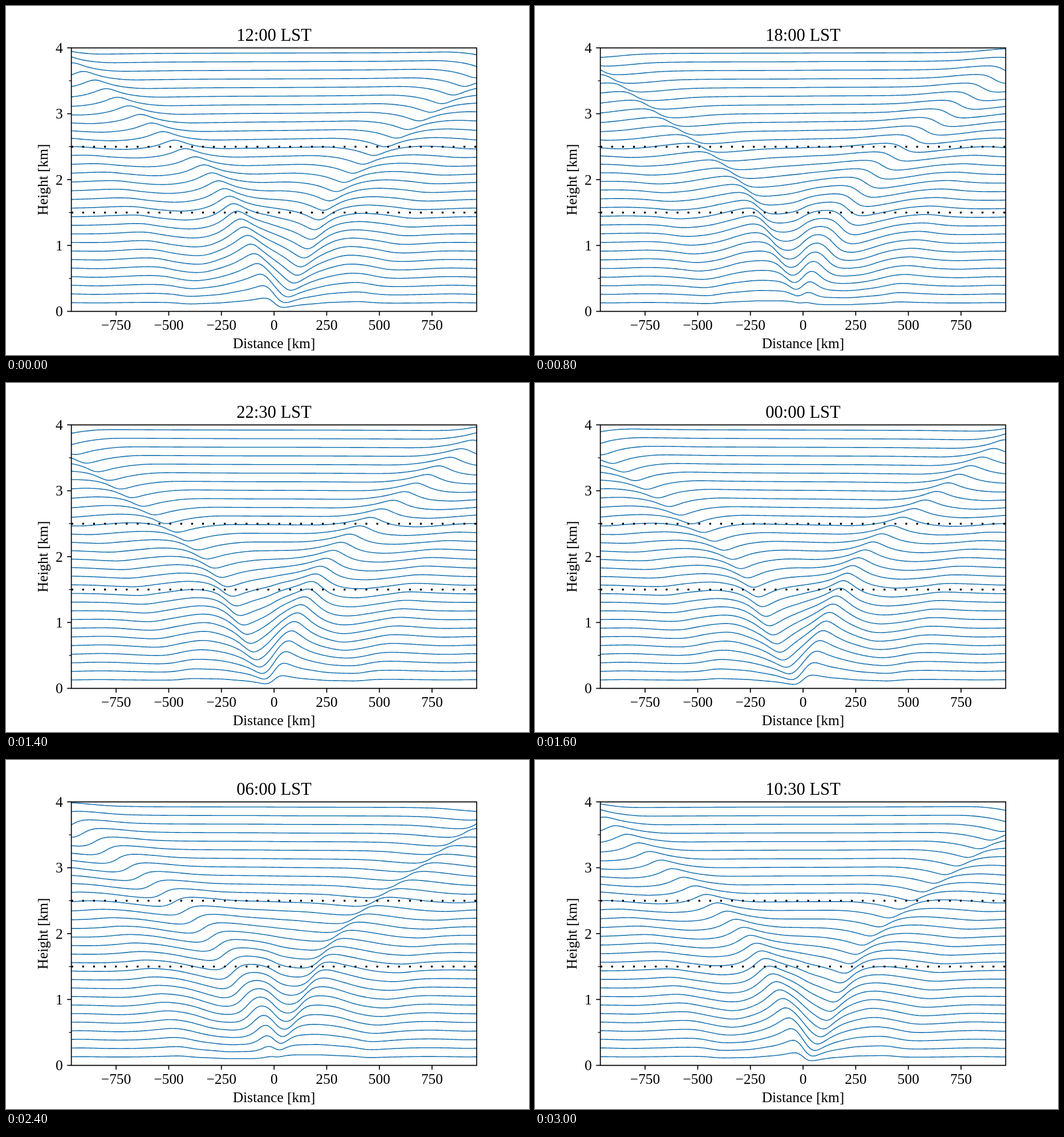
An HTML page that plays this animation: 917x611 px, repeating every 3.2 s.

```html
<!DOCTYPE html>
<html lang="en">
<head>
<meta charset="utf-8">
<title>Diurnal wave beams</title>
<style>
  html, body { margin: 0; width: 100%; height: 100%; overflow: hidden; background: #fff; }
  svg { display: block; width: 917px; height: 611px; }
  text { font: 25.4px "Liberation Serif", "Times New Roman", serif; text-anchor: middle; }
  #title { font-size: 30.5px; }
  .end { text-anchor: end; }
  .wave { fill: none; stroke: #1f77b4; stroke-width: 1.6; stroke-linejoin: round; }
  .axis { fill: none; stroke: #000; stroke-width: 1.7; }
  .minor { stroke: #000; stroke-width: 1.27; }
  .dots { stroke: #000; stroke-width: 3.18; stroke-dasharray: 3.18 15.92; }
</style>
</head>
<body>
<svg viewBox="0 0 917 611">
  <clipPath id="clip"><rect x="114.6" y="73.3" width="710.7" height="461.3"/></clipPath>
  <g id="waves" clip-path="url(#clip)"></g>
  <g id="axes"></g>
  <text id="title" x="470" y="60.6"></text>
  <text x="470" y="599">Distance [km]</text>
  <text transform="translate(72.5 304) rotate(-90)">Height [km]</text>
</svg>
<script>
const LEFT = 114.6, RIGHT = 825.3, TOP = 73.3, BOTTOM = 534.6, MID = 470;
const KM_X = 0.3693, KM_Y = (BOTTOM - TOP) / 4;
const xPx = km => MID + km * KM_X, yPx = km => BOTTOM - km * KM_Y;

function add(parent, tag, attrs, text) {
  const el = document.createElementNS("http://www.w3.org/2000/svg", tag);
  for (const name in attrs) el.setAttribute(name, attrs[name]);
  if (text !== undefined) el.textContent = text;
  return document.getElementById(parent).appendChild(el);
}
const path = (d, cls) => add("axes", "path", { d, class: cls });

// Axes, ticks and guide lines
for (const z of [1.5, 2.5]) path(`M${LEFT} ${yPx(z)}H${RIGHT}`, "dots");
path(`M${LEFT} ${TOP}H${RIGHT}V${BOTTOM}H${LEFT}Z`, "axis");
for (let km = -750; km <= 750; km += 250) {
  path(`M${xPx(km)} ${BOTTOM}v7.4`, "axis");
  add("axes", "text", { x: xPx(km), y: 566.8 }, String(km).replace("-", "\u2212"));
}
for (let z = 0; z <= 4; z++) {
  path(`M${LEFT} ${yPx(z)}h-7.4`, "axis");
  add("axes", "text", { x: 99.8, y: yPx(z) + 8.6, class: "end" }, z);
  if (z < 4) path(`M${LEFT} ${yPx(z + 0.5)}h-4.2`, "minor");
}

// Linear hydrostatic response to diurnal coastal heating (lengths in km):
// w'' + (N k / omega)^2 w = k e^(-kL) e^(-z/H), w(0) = 0, radiating upwards.
const LINES = 30, GAP = 0.1307, SUB = 20, STEP = GAP / SUB, COUNT = LINES * SUB;
const L = 50, H = 1, DK = 0.001, KMAX = 0.15, AMP = 9300, OMEGA = 2 * Math.PI / 86400;
const slope = z => (0.01 + 0.02 * Math.min(1, Math.max(0, z - 1.5))) / OMEGA;

const slopes2 = [], heat = [];
for (let i = 0; i <= COUNT; i++) {
  slopes2.push(slope(i * STEP) ** 2);
  heat.push(Math.exp(-i * STEP / H));
}

// Complex vertical profile of one horizontal mode at each line height
function mode(k) {
  const s = k * Math.exp(-k * L), h2 = STEP * STEP;
  const u = [0, STEP], v = [0, s * h2 / 2];
  for (let i = 1; i <= COUNT; i++) {
    const m2 = slopes2[i] * k * k;
    u.push(2 * u[i] - u[i - 1] - h2 * m2 * u[i]);
    v.push(2 * v[i] - v[i - 1] + h2 * (s * heat[i] - m2 * v[i]));
  }
  const rate = a => (a[COUNT + 1] - a[COUNT - 1]) / (2 * STEP);
  const m = k * Math.sqrt(slopes2[COUNT]);
  const p = s / (m * m + 1 / (H * H)) * heat[COUNT];
  const du = rate(u), mu = m * u[COUNT];
  const nr = -p / H - rate(v), ni = m * (v[COUNT] - p);
  const size = du * du + mu * mu;
  const cr = (nr * du - ni * mu) / size, ci = (nr * mu + ni * du) / size;
  const re = [], im = [];
  for (let n = 1; n <= LINES; n++) {
    re.push(v[n * SUB] + cr * u[n * SUB]);
    im.push(ci * u[n * SUB]);
  }
  return { k, re, im };
}

const modes = [];
for (let k = DK / 2; k < KMAX; k += DK) modes.push(mode(k));

const xs = [];
for (let x = LEFT; x < RIGHT + 2.5; x += 2.5) xs.push(x);
const sines = xs.map(x => modes.map(m => Math.sin(m.k * (x - MID) / KM_X)));
const sum = (row, part, n) =>
  AMP * DK * KM_Y * modes.reduce((t, m, j) => t + m[part][n] * row[j], 0);

const waves = Array.from({ length: LINES }, (_, n) => ({
  y: yPx((n + 1) * GAP),
  re: sines.map(row => sum(row, "re", n)),
  im: sines.map(row => sum(row, "im", n)),
  el: add("waves", "path", { class: "wave" })
}));

// One step is 1.5 hours, starting at noon
const title = document.getElementById("title");
function draw(step) {
  const phase = step * Math.PI / 8, c = Math.cos(phase), s = Math.sin(phase);
  for (const w of waves) {
    w.el.setAttribute("d", "M" + xs.map((x, i) =>
      x.toFixed(1) + " " + (w.y - c * w.im[i] - s * w.re[i]).toFixed(2)).join("L"));
  }
  const minutes = (720 + step * 90) % 1440;
  const two = v => String(Math.floor(v)).padStart(2, "0");
  title.textContent = `${two(minutes / 60)}:${two(minutes % 60)} LST`;
}

const start = performance.now();
let shown = -1;
function tick() {
  const step = Math.floor((performance.now() - start) / 200) % 16;
  if (step !== shown) draw(shown = step);
  requestAnimationFrame(tick);
}
tick();
</script>
</body>
</html>
```
